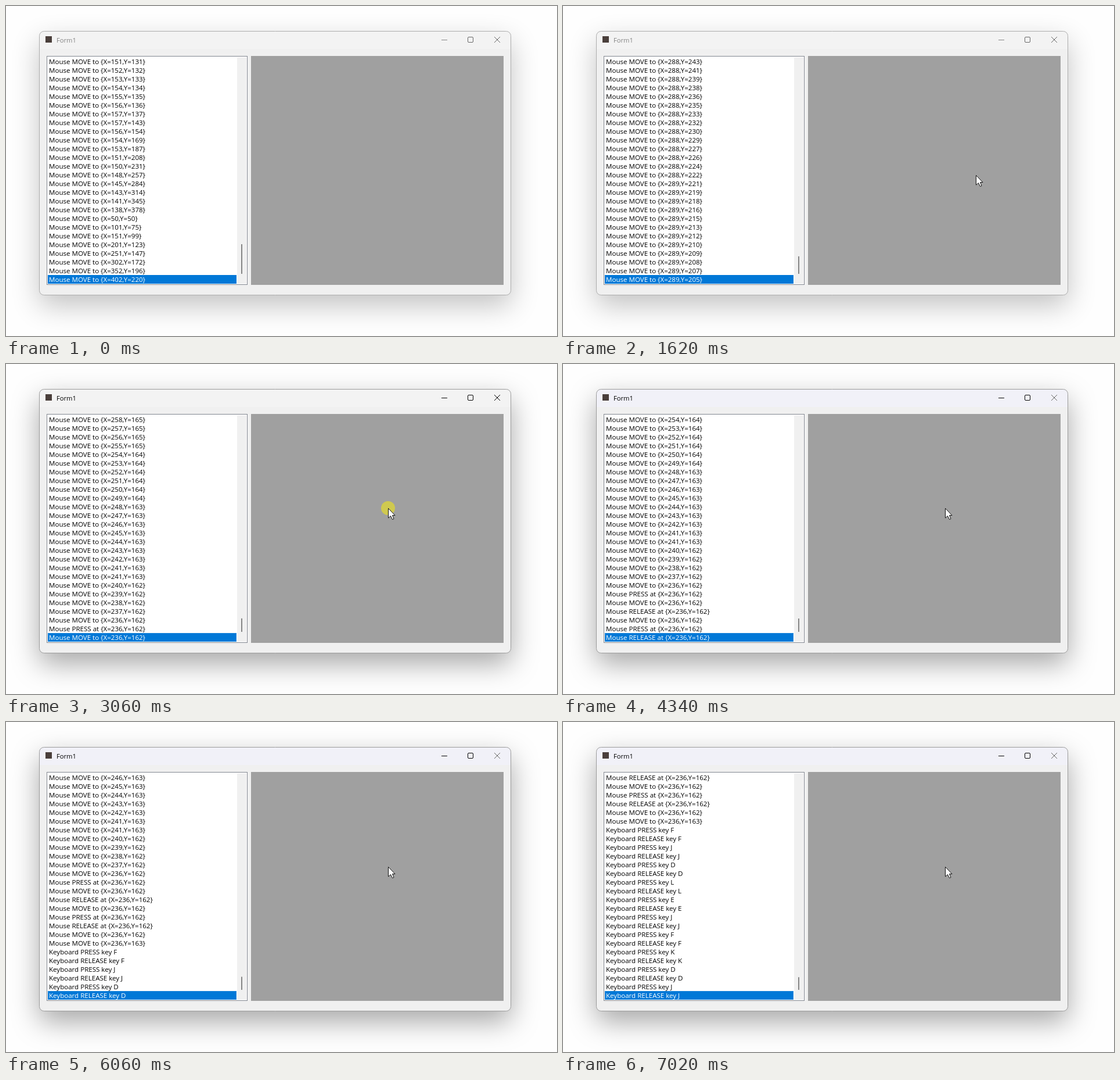
An HTML page with a canvas that plays this animation: 949x568 px, repeating every 8 s.

```html
<!DOCTYPE html>
<html lang="en">
<head>
<meta charset="utf-8">
<title>Input event log</title>
<style>
  html, body { margin: 0; height: 100%; overflow: hidden; background: #fefefe; }
  canvas { display: block; }
</style>
</head>
<body>
<canvas id="stage" width="949" height="568"></canvas>
<script>
const ctx = document.getElementById('stage').getContext('2d', { alpha: false });
const LOOP = 8000, TICK = 70, ROWS = 26, ROW_HEIGHT = 15, SCROLLED_OFF = 156;
const ENTER = 450, FOCUS = 3060;
const FONT = '"Open Sans", "Noto Sans", sans-serif';
const PANEL = { x: 422, y: 86, w: 435, h: 394 };

// --- Event log: a script that stamps each event with its time -----------
const events = [];
let clock = 0, origin = 0, held = false, x = 0, y = 0;

function log(text) {
  // The screen only refreshes once per tick.
  const time = origin + Math.ceil((clock - origin) / TICK) * TICK;
  events.push({ text, time, x, y, held });
}

function at(time) { clock = origin = time; }

function place(toX, toY) { x = toX; y = toY; }

function mouse(action) { log(`Mouse ${action} {X=${x},Y=${y}}`); }

function glide(toX, toY, count, ms = 0, power = 1) {
  const fromX = x, fromY = y;
  for (let i = 1; i <= count; i++) {
    const p = (i / count) ** power;
    clock += ms / count;
    place(Math.round(fromX + (toX - fromX) * p), Math.round(fromY + (toY - fromY) * p));
    mouse('MOVE to');
  }
}

function press() { held = true; mouse('PRESS at'); }
function release() { held = false; mouse('RELEASE at'); }

function key(letter, down, up) {
  at(down);
  log(`Keyboard PRESS key ${letter}`);
  at(up);
  log(`Keyboard RELEASE key ${letter}`);
}

// Earlier movement
place(150, 130);
glide(157, 137, 7);
glide(138, 378, 11, 0, 1.55);
place(0, 26);
glide(402, 220, 8);

// In from below, up the panel
at(ENTER);
place(330, 393);
glide(305, 347, 37, 231);
glide(299, 337, 10, 62);
glide(291, 318, 9, 56, 1.15);
glide(285, 303, 6, 45);
glide(289, 210, 60, 445);

// Bend to the left and slow down
at(1550);
glide(290, 194, 14, 200);
glide(287, 185, 11, 158);
glide(279, 176, 14, 200);
glide(258, 165, 33, 196);
glide(245, 163, 13, 80);
glide(236, 162, 10, 208);

// Two clicks
at(FOCUS); press(); glide(236, 162, 1);
at(3670); release(); glide(236, 162, 1);
at(4060); press();
at(4260); release();
at(4365); glide(236, 162, 1);
at(4470); glide(236, 163, 1);

// Typing, slow at first and then ever faster
key('F', 5070, 5270);
key('J', 5530, 5660);
const strokeTime = i => 5870 + 1150 * (i / 15) ** 0.86;
[...'DLEJFKDJ'].forEach((letter, i) => key(letter, strokeTime(2 * i), strokeTime(2 * i + 1)));

const loggedBy = t => events.filter(event => event.time <= t).length;

// --- Drawing -----------------------------------------------------------
function rect(color, left, top, w, h) {
  ctx.fillStyle = color;
  ctx.fillRect(left, top, w, h);
}

function label(text, left, baseline, color, size = 11.55) {
  ctx.font = `${size}px ${FONT}`;
  ctx.fillStyle = color;
  ctx.fillText(text, left, baseline);
}

function line(color, x1, y1, x2, y2) {
  ctx.strokeStyle = color;
  ctx.beginPath();
  ctx.moveTo(x1, y1);
  ctx.lineTo(x2, y2);
  ctx.stroke();
}

function drawWindow(t) {
  const active = t >= FOCUS;
  const ink = active ? '#000' : '#858585';

  ctx.save();
  ctx.shadowColor = `rgba(0, 0, 0, ${active ? 0.35 : 0.24})`;
  ctx.shadowBlur = 48;
  ctx.shadowOffsetY = 18;
  ctx.fillStyle = '#f0f0f0';
  ctx.beginPath();
  ctx.roundRect(57.5, 43.5, 812, 454, 8);
  ctx.fill();
  ctx.restore();

  ctx.save();
  ctx.clip();
  rect(t >= FOCUS + TICK ? '#f1f1f8' : '#f3f3f3', 58, 44, 811, 30);
  ctx.restore();
  ctx.strokeStyle = active ? '#9c9c9c' : '#adadad';
  ctx.stroke();

  rect('#4a3f3b', 68, 52, 11, 11);
  label('Form1', 87, 63, ink, 11.2);
  line(ink, 750, 58.5, 760, 58.5);
  ctx.strokeStyle = active ? '#000' : '#666';
  ctx.beginPath();
  ctx.roundRect(795.5, 53.5, 9, 9, 1.5);
  ctx.stroke();
  const closeInk = active && t < FOCUS + 4 * TICK ? '#000' : '#666';
  line(closeInk, 841, 53, 851, 63);
  line(closeInk, 851, 53, 841, 63);

  rect('#a0a0a0', PANEL.x, PANEL.y, PANEL.w, PANEL.h);
}

function drawList(t, count) {
  rect('#fff', 70, 86, 346, 394);
  ctx.strokeStyle = '#828790';
  ctx.strokeRect(70.5, 86.5, 345, 393);
  rect('#f0f0f0', 398, 88, 16, 390);
  const thumb = 357 * ROWS / (SCROLLED_OFF + count);
  rect('#858585', 405, 461 - thumb, 2, thumb);

  // When events pour in quickly, the last rows are not painted in time.
  const flooded = t >= ENTER && count - loggedBy(t - TICK) > 10;
  const painted = flooded ? ROWS - 6 : ROWS;
  events.slice(count - painted, count).forEach((event, i) => {
    const top = 88 + i * ROW_HEIGHT;
    const selected = i === ROWS - 1;
    if (selected) {
      rect('#0078d7', 72, top, 325, ROW_HEIGHT);
      if (t >= FOCUS) {
        ctx.setLineDash([1, 1]);
        ctx.strokeStyle = '#3d95dc';
        ctx.strokeRect(72.5, top + 0.5, 324, ROW_HEIGHT - 1);
        ctx.setLineDash([]);
      }
    }
    label(event.text, 74, top + 12, selected ? '#fff' : '#000');
  });
}

const arrow = new Path2D('M0 0V16.5L4 13L7 19L9.5 18L7 12H11.5Z');

function drawPointer(t, count) {
  if (t < ENTER) return;
  // The list lags a few events behind the fast upward sweep.
  const lag = t < 1290 ? 6 : 0;
  const outside = { x: 367, y: 412 };
  const spot = t < ENTER + TICK ? outside : events[count + lag - 1];

  ctx.save();
  ctx.translate(PANEL.x + spot.x, PANEL.y + spot.y);
  if (spot.held) {
    ctx.fillStyle = '#cfc94f';
    ctx.beginPath();
    ctx.arc(0, 0, 12, 0, 2 * Math.PI);
    ctx.fill();
  }
  ctx.translate(0.5, 0.5);
  ctx.fillStyle = '#fff';
  ctx.fill(arrow);
  ctx.strokeStyle = '#111';
  ctx.stroke(arrow);
  ctx.restore();
}

function draw(t) {
  const count = loggedBy(t);
  rect('#fefefe', 0, 0, 949, 568);
  drawWindow(t);
  drawList(t, count);
  drawPointer(t, count);
}

const start = performance.now();
function tick() {
  draw((performance.now() - start) % LOOP);
  requestAnimationFrame(tick);
}
tick();
</script>
</body>
</html>
```
